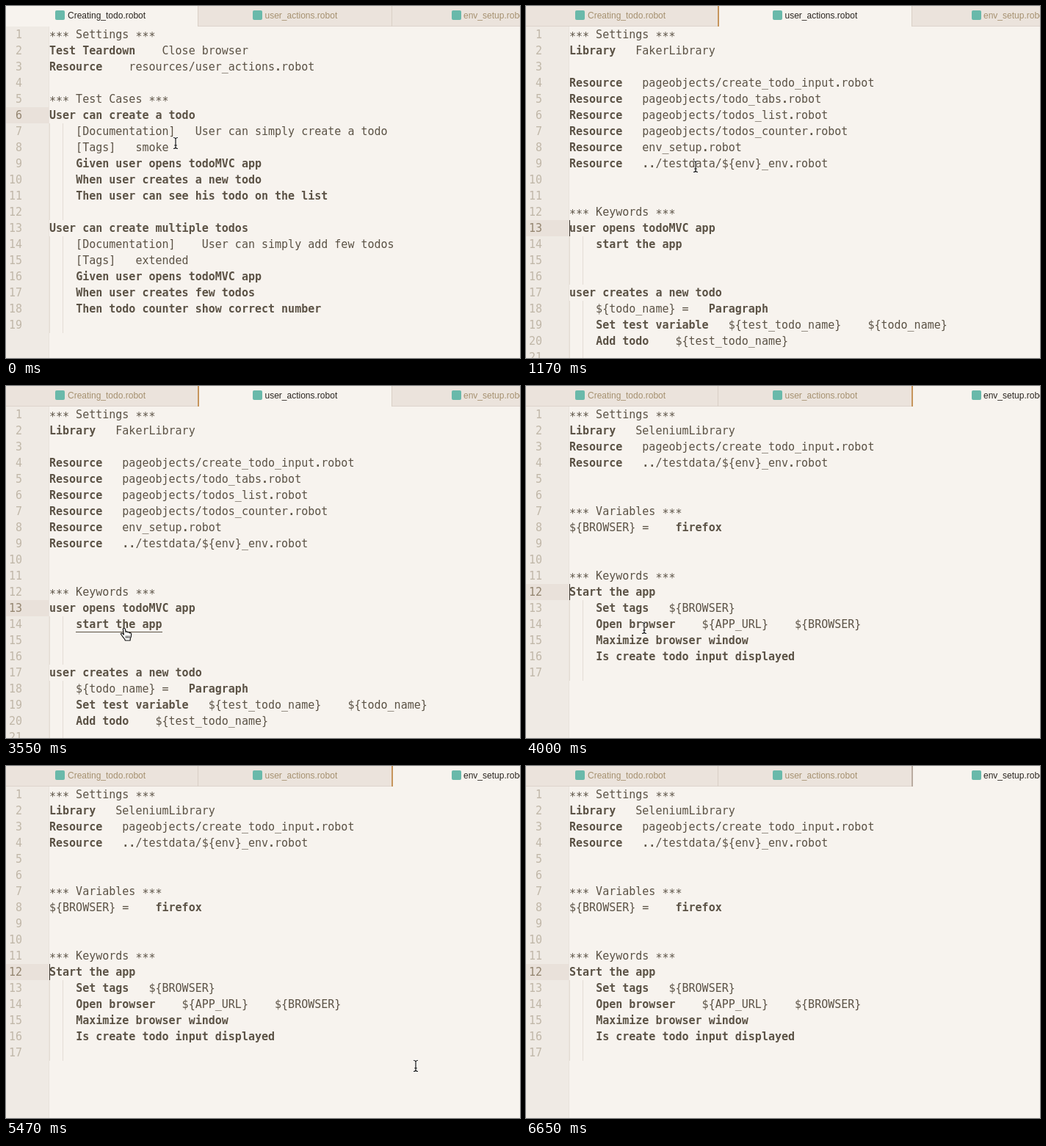
An HTML page for the animation above (6.75 s loop, 700 by 480 pixels).

```html
<!DOCTYPE html>
<html lang="en">
<head>
<meta charset="utf-8">
<title>Editor walkthrough</title>
<style>
  html, body { margin: 0; width: 100%; height: 100%; overflow: hidden; background: #f7f3ee; }
  #stage { position: absolute; left: 0; top: 0; width: 700px; height: 480px; overflow: hidden; background: #f7f3ee; }
  #stage div, #stage svg { position: absolute; }
  #gutter { left: 0; top: 28px; width: 58px; height: 452px; background: #efeae4; }
  .page { left: 0; top: 28px; width: 700px; height: 452px; font: 15px/22px "DejaVu Sans Mono", monospace; color: #5b5245; }
  .row { left: 0; width: 700px; height: 22px; white-space: pre; }
  .num { left: 0; width: 22px; text-align: right; color: #c0b7a8; }
  .row.on::before { content: ""; position: absolute; left: 0; top: 0; width: 58px; height: 22px; background: #e9e1da; }
  .row.on .num { color: #948570; }
  .code { left: 59px; }
  .code i { font-style: normal; position: relative; top: 3px; }
  .guide { width: 1px; background: #e4ddd5; }
  .tab { top: 0; height: 27px; box-sizing: border-box; background: #ebe3dc; border-bottom: 1px solid #ddd4cc; height: 28px;
         font: 12px/26px "Liberation Sans", Arial, sans-serif; color: #a5906f; white-space: pre; }
  .tab.on { background: #f7f3ee; border-color: #f7f3ee; color: #29241f; }
  .badge { top: 6px; width: 13px; height: 13px; border-radius: 2px; background: #69b9aa; }
  .edge { top: 0; width: 1px; height: 28px; background: #d9cfc6; }
  #accent { top: 0; width: 2px; height: 28px; }
  #caret { left: 59px; width: 1px; height: 22px; background: #3d362f; }
  #line { left: 95px; height: 1px; background: #5b5245; }
</style>
</head>
<body>
<div id="stage"></div>
<script>
const LOOP = 6750;
const stage = document.getElementById("stage");

// ~text~ is bold
const pages = [
  { from: 0, active: 6, guides: [[7, 12], [14, 19]], lines: [
    "*** Settings ***",
    "~Test Teardown~    Close browser",
    "~Resource~    resources/user_actions.robot",
    "",
    "*** Test Cases ***",
    "~User can create a todo~",
    "    [Documentation]   User can simply create a todo",
    "    [Tags]   smoke",
    "    ~Given user opens todoMVC app~",
    "    ~When user creates a new todo~",
    "    ~Then user can see his todo on the list~",
    "",
    "~User can create multiple todos~",
    "    [Documentation]    User can simply add few todos",
    "    [Tags]   extended",
    "    ~Given user opens todoMVC app~",
    "    ~When user creates few todos~",
    "    ~Then todo counter show correct number~",
    ""] },
  { from: 1170, active: 13, guides: [[14, 16], [18, 21]], lines: [
    "*** Settings ***",
    "~Library~   FakerLibrary",
    "",
    "~Resource~   pageobjects/create_todo_input.robot",
    "~Resource~   pageobjects/todo_tabs.robot",
    "~Resource~   pageobjects/todos_list.robot",
    "~Resource~   pageobjects/todos_counter.robot",
    "~Resource~   env_setup.robot",
    "~Resource~   ../testdata/${env}_env.robot",
    "",
    "",
    "*** Keywords ***",
    "~user opens todoMVC app~",
    "    ~start the app~",
    "",
    "",
    "~user creates a new todo~",
    "    ${todo_name} =   ~Paragraph~",
    "    ~Set test variable~   ${test_todo_name}    ${todo_name}",
    "    ~Add todo~    ${test_todo_name}",
    ""] },
  { from: 4000, active: 12, guides: [[13, 17]], lines: [
    "*** Settings ***",
    "~Library~   SeleniumLibrary",
    "~Resource~   pageobjects/create_todo_input.robot",
    "~Resource~   ../testdata/${env}_env.robot",
    "",
    "",
    "*** Variables ***",
    "${BROWSER} =    ~firefox~",
    "",
    "",
    "*** Keywords ***",
    "~Start the app~",
    "    ~Set tags~   ${BROWSER}",
    "    ~Open browser~    ${APP_URL}    ${BROWSER}",
    "    ~Maximize browser window~",
    "    ~Is create todo input displayed~",
    ""] }
];

// left edge, width, badge x, label x
const tabs = [
  [0, 261, 67, 84, "Creating_todo.robot"],
  [262, 263, 336, 352.5, "user_actions.robot"],
  [526, 264, 607, 623, "env_setup.robot"]
];

// time, hot spot x, y
const path = [
  [0, 231, 187], [140, 234, 165], [290, 235, 147], [440, 234, 166], [580, 232, 196], [730, 231, 219],
  [1920, 230, 226], [2070, 222, 256], [2210, 206, 300], [2360, 188, 338], [2500, 174, 353], [2650, 165, 342], [2800, 161, 330],
  [4740, 190, 336], [4890, 290, 362], [5030, 425, 405], [5180, 535, 432], [5320, 575, 437],
  [5470, 558, 409], [5610, 578, 417], [5760, 595, 427]
];
const CURSOR_END = 5910;

// from, to, width, y of the link underline
const links = [[880, 1170, 253, 225], [3100, 4000, 118, 335]];

// spans in which the text caret shows
const blinks = [[1170, 1920], [2360, 2650], [3100, 3550], [4000, 4290], [4740, 5030], [5470, 5910], [6360, 6650]];

function add(parent, cls, css = {}, html = "") {
  const el = document.createElement("div");
  el.className = cls;
  el.innerHTML = html;
  Object.assign(el.style, css);
  parent.append(el);
  return el;
}

const px = n => n + "px";
const rowTop = n => (n - 1) * 22;

const markup = s => s
  .split("~").map((part, i) => i % 2 ? `<b>${part}</b>` : part.replace(/\.+/g, "<b>$&</b>")).join("")
  .replace(/\*+/g, "<i>$&</i>");

function buildPage({ active, guides, lines }) {
  const page = add(stage, "page");
  lines.forEach((text, i) => {
    const row = add(page, i + 1 === active ? "row on" : "row", { top: px(rowTop(i + 1)) });
    add(row, "num", {}, i + 1);
    add(row, "code", {}, markup(text));
  });
  for (const [a, b] of guides)
    for (const x of [59, 77])
      add(page, "guide", { left: px(x), top: px(rowTop(a)), height: px((b - a + 1) * 22) });
  return page;
}

function buildTab([left, width, badge, label, name]) {
  const tab = add(stage, "tab", { left: px(left), width: px(width) });
  add(tab, "badge", { left: px(badge - left) });
  add(tab, "label", { left: px(label - left) }, name);
  return tab;
}

add(stage, "").id = "gutter";
add(stage, "guide", { left: "58px", top: "28px", height: "452px", background: "#e9e3dc" });
const pageEls = pages.map(buildPage);
const tabEls = tabs.map(buildTab);
for (const x of [261, 525]) add(stage, "edge", { left: px(x) });

const [accent, caret, line] = ["accent", "caret", "line"].map(id => {
  const el = add(stage, "");
  el.id = id;
  return el;
});

stage.insertAdjacentHTML("beforeend", `
  <svg id="beam" width="12" height="20" viewBox="-6 -10 12 20" fill="none">
    <path id="stem" d="M-3-7.5Q-.5-7.5 0-6Q.5-7.5 3-7.5M0-6V6M-3 7.5Q-.5 7.5 0 6Q.5 7.5 3 7.5M-1.8 3H1.8" stroke="#fff" stroke-width="2.6"/>
    <path d="M-3-7.5Q-.5-7.5 0-6Q.5-7.5 3-7.5M0-6V6M-3 7.5Q-.5 7.5 0 6Q.5 7.5 3 7.5M-1.8 3H1.8" stroke="#111" stroke-width="1.2"/>
  </svg>
  <svg id="hand" width="20" height="20" viewBox="-6 -1 20 20">
    <path d="M-1.6 1.6C-1.6-.2 1-.2 1.3 1.5L2.2 5.6C2.6 4.5 4.6 4.7 4.9 6C5.5 5.2 7.2 5.5 7.4 6.8C8.2 6.2 9.6 6.7 9.6 8.2
      C9.7 11 9.3 12.5 8.3 14.2L8.1 17H1.4C1 15.2-.6 13.8-1.8 12.2C-2.8 10.8-3.3 9.6-4.3 8.6C-5.2 7.3-3.5 6.5-2.3 7.4L-.6 9Z"
      fill="#fff" stroke="#111" stroke-width="1.2" stroke-linejoin="round"/>
    <path d="M2.6 10.5V14M4.7 10.5V14M6.8 10.5V14" stroke="#111" stroke-width=".9"/>
  </svg>`);
const beam = document.getElementById("beam");
const hand = document.getElementById("hand");

const show = (el, on) => { el.style.visibility = on ? "visible" : "hidden"; };
const place = (el, x, y) => { el.style.left = px(x); el.style.top = px(y); };
const inside = t => ([a, b]) => t >= a && t < b;

function draw(t) {
  const current = pages.findLastIndex(p => t >= p.from);
  pageEls.forEach((el, i) => show(el, i === current));
  tabEls.forEach((el, i) => el.classList.toggle("on", i === current));

  show(accent, current > 0);
  accent.style.left = px(tabs[current][0] - 1);
  accent.style.background = t < 6650 ? "#c6955c" : "#b9aba0";

  show(caret, blinks.some(inside(t)));
  caret.style.top = px(28 + rowTop(pages[current].active));

  const link = links.find(inside(t));
  show(line, link);
  if (link) {
    line.style.width = px(link[2]);
    line.style.top = px(link[3]);
  }

  const [, x, y] = path.findLast(p => t >= p[0]);
  show(beam, !link && t < CURSOR_END);
  show(hand, link);
  place(beam, x - 6, y - 10);
  place(hand, x - 6, y - 1);
}

function tick() {
  draw(performance.now() % LOOP);
  requestAnimationFrame(tick);
}
tick();
</script>
</body>
</html>
```
